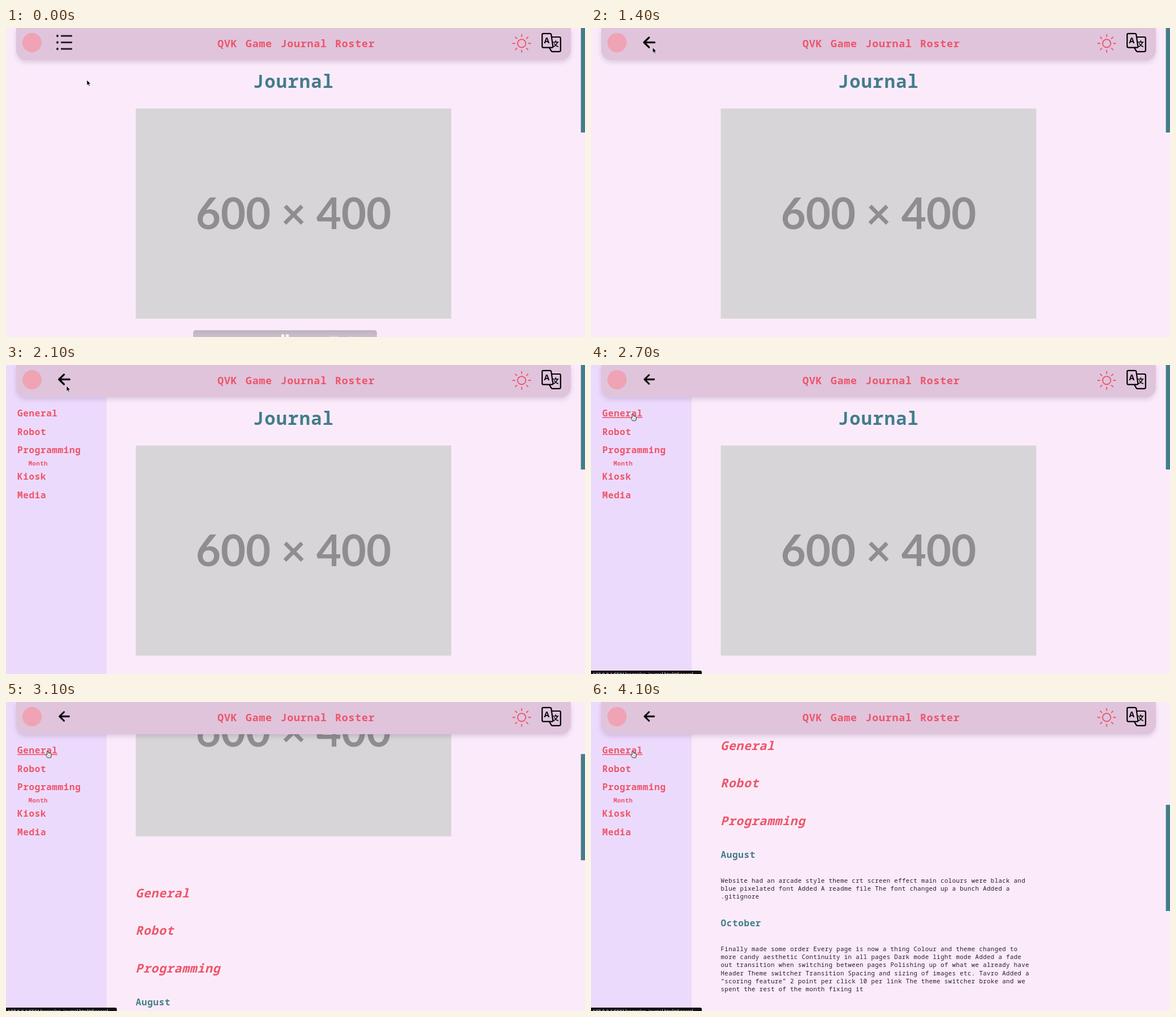
These frames come from a looping animation (1024x547 px, 4.2 s). An HTML page:

```html
<!DOCTYPE html>
<html lang="en">
<head>
<meta charset="utf-8">
<title>Journal</title>
<style>
  :root { --red: #ee5569; --teal: #437d8a; }
  html, body { margin: 0; width: 100%; height: 100%; overflow: hidden; background: #fbebfa; }
  #stage { position: relative; width: 1024px; height: 547px; overflow: hidden; background: #fbebfa; }
  #stage svg { position: absolute; left: 0; top: 0; display: block; }
  text { font-family: "Noto Sans Mono", "DejaVu Sans Mono", monospace; font-size: 10.7px; letter-spacing: .038em; }
  .nav, .title, .side, .small, .head, .month { font-weight: 700; fill: var(--red); }
  .nav { font-size: 18.4px; }
  .title { font-size: 32.1px; fill: var(--teal); text-anchor: middle; }
  .head { font-size: 21.4px; font-style: italic; }
  .side, .month { font-size: 16.05px; }
  .month { fill: var(--teal); }
  .body { fill: #231f25; }
  .size { font: 700 76px Lato, sans-serif; letter-spacing: 0; fill: #8f8d90; text-anchor: middle; }
  .url { font: 8.5px "Liberation Sans", Arial, sans-serif; letter-spacing: 0; fill: #fff; }
  .letter { font: 700 14px "Open Sans", sans-serif; letter-spacing: 0; text-anchor: middle; }
  #side { position: absolute; left: 0; top: 0; width: 0; height: 547px; overflow: hidden; background: #ecdafc; }
  #header { position: absolute; left: 18px; top: 0; width: 981px; height: 57px; background: #e0c4dc;
    border-radius: 0 0 18px 18px; box-shadow: 0 4px 8px rgba(90, 50, 110, .18); }
  .line { fill: none; stroke: #000; stroke-linecap: round; stroke-linejoin: round; }
</style>
</head>
<body>
<div id="stage">
  <svg width="1024" height="547">
    <g id="page">
      <text class="title" x="508.5" y="106">Journal</text>
      <rect x="229.5" y="142.5" width="558" height="372" fill="#d8d5d8"/>
      <text class="size" x="508.5" y="355.5">600 × 400</text>
    </g>
    <rect id="thumb" x="1016.7" width="7.3" height="188" fill="#437d8a"/>
  </svg>

  <div id="side"><svg id="links" width="178" height="547">
    <rect id="underline" x="20" y="92.2" width="71" height="1.6" fill="#ee5569"/>
  </svg></div>

  <div id="header"></div>

  <svg id="top" width="1024" height="547">
    <defs>
      <linearGradient id="shade" x2="0" y2="1">
        <stop stop-color="#bdb1bd"/><stop offset="1" stop-color="#c9bfc9"/>
      </linearGradient>
    </defs>
    <circle cx="46" cy="26" r="17" fill="#efa3b4"/>
    <g transform="translate(103 25.5)"><g id="icon">
      <g id="menu">
        <path class="line" stroke-width="2.4" d="M-5-11.5H13M-5 0H13M-5 11.5H13"/>
        <path class="line" stroke-width="3.8" d="M-12-11.5h.01M-12 0h.01M-12 11.5h.01"/>
      </g>
      <path id="back" class="line" stroke-width="2.9" d="M8.6 0H-8.4M-.4-7.8L-8.4 0-.4 7.8"/>
    </g></g>
    <g id="sun" transform="translate(912 27.3)" fill="none" stroke="#ee5569" stroke-width="1.9" stroke-linecap="round">
      <circle r="7.2"/>
    </g>
    <g class="line" stroke-width="2.2">
      <path d="M950.2 9.8H962q2 0 2.300 2l3 21q.2 1.800-1.600 1.800H950.200q-2 0-2-2V11.800q0-2 2-2z"/>
      <path d="M965.500 16H978.600q2.200 0 2.200 2.200V39.600q0 2.200-2.200 2.200H966.500q-1.600 0-2.300-1.400L961 35"/>
      <path stroke-width="1.6" d="M967.800 25h9M972.300 22.600V25M975.300 25q-1.500 5.500-6.800 8M969.800 27.500q2 4 6.500 5.500"/>
    </g>
    <text class="letter" x="956.3" y="27">A</text>

    <g id="player">
      <path d="M331 547V540q0-5 5-5H651q5 0 5 5V547z" fill="url(#shade)"/>
      <path d="M487 542.500h5V547h-5zM495 542.500h5V547h-5z" fill="#fff"/>
      <path d="M573 547V545.500H586V547M607 547L609.500 545 612 547" fill="none" stroke="#dfd8df"/>
    </g>
    <g id="status">
      <path d="M0 541H193q3 0 3 3V547H0z" fill="#121014"/>
      <text class="url" x="3" y="550.500">127.0.0.1:5501/pages/en_journal.html#General</text>
    </g>
    <g id="cursor">
      <path id="arrow" d="M0 0V9.500L2.200 7.500 3.800 11 5.400 10.300 3.900 6.900H6.900z" stroke="#fff" stroke-width=".7"/>
      <g id="hand" fill="#fff" stroke="#1a1418" stroke-linejoin="round">
        <path d="M-1.200 1Q0-.6 1.200 1V4Q5 4 6 5.500V8Q6 10 5 12H-.5Q-2 9.500-3.600 7.500-3 5.600-1.200 7z"/>
        <path d="M1.200 7.500v2M3.200 7.500v2" stroke-width=".6"/>
      </g>
    </g>
  </svg>
</div>
<script>
const LOOP = 4200, STEP = 100, SCROLL = 538;
const $ = id => document.getElementById(id);

function add(parent, tag, attrs, content = '') {
  const el = document.createElementNS('http://www.w3.org/2000/svg', tag);
  for (const name in attrs) el.setAttribute(name, attrs[name]);
  el.textContent = content;
  $(parent).append(el);
}
const write = (parent, cls, x, y, str) => add(parent, 'text', { class: cls, x, y }, str);
const lines = (y, list) => list.forEach((str, i) => write('page', 'body', 229.5, y + i * 14.2, str));

[['QVK', 374], ['Game', 423.7], ['Journal', 485.5], ['Roster', 582]]
  .forEach(([str, x]) => write('top', 'nav', x, 34, str));
[['General', 91], ['Robot', 123.5], ['Programming', 156], ['Kiosk', 203], ['Media', 235.5]]
  .forEach(([str, y]) => write('links', 'side', 20, y, str));
write('links', 'small', 39.7, 177.5, 'Month');

[['General', 623], ['Robot', 689], ['Programming', 755.5]]
  .forEach(([str, y]) => write('page', 'head', 229, y, str));
write('page', 'month', 229.5, 814, 'August');
lines(858, [
  'Website had an arcade style theme crt screen effect main colours were black and',
  'blue pixelated font Added A readme file The font changed up a bunch Added a',
  '.gitignore'
]);
write('page', 'month', 229.5, 935, 'October');
lines(979, [
  'Finally made some order Every page is now a thing Colour and theme changed to',
  'more candy aesthetic Continuity in all pages Dark mode light mode Added a fade',
  'out transition when switching between pages Polishing up of what we already have',
  'Header Theme switcher Transition Spacing and sizing of images etc. Tavro Added a',
  '“scoring feature” 2 point per click 10 per link The theme switcher broke and we',
  'spent the rest of the month fixing it'
]);
for (let a = 0; a < 360; a += 45)
  add('sun', 'path', { d: 'M0-12.2V-15.6', transform: `rotate(${a})` });

// Each step: [time, value, easing towards the next step].
const tracks = [];
function track(id, prop, steps) {
  const all = [[0, steps[0][1]], ...steps, [LOOP, steps.at(-1)[1]]];
  const frames = all.map(([t, value, easing = 'linear']) => ({ offset: t / LOOP, [prop]: value, easing }));
  const anim = $(id).animate(frames, { duration: LOOP, fill: 'both' });
  anim.pause();
  tracks.push(anim);
}
const show = (id, from, to = LOOP) => track(id, 'opacity',
  [[0, from ? 0 : 1, 'steps(1)'], [from, 1, 'steps(1)'], [to, to < LOOP ? 0 : 1]]);
const move = (x, y) => `translate(${x}px, ${y}px)`;
const glide = (id, from, to) => track(id, 'transform',
  [[2764, move(0, from), 'cubic-bezier(.42, 0, .58, 1)'], [3425, move(0, to)]]);

glide('page', 0, -SCROLL);
glide('thumb', -3, 182);
track('side', 'width', [[1430, '0px', 'ease'], [1930, '178px']]);
track('icon', 'transform', [[600, 'scale(1)'], [800, 'scale(1.1)'], [2200, 'scale(1.1)'], [2400, 'scale(1)']]);
track('player', 'opacity', [[100, 1], [600, 0]]);
track('cursor', 'transform', [
  [100, move(143, 92), 'ease-in-out'], [600, move(117, 38)], [800, move(117, 37)],
  [1200, move(110, 35)], [1600, move(108, 34)], [2100, move(107, 37), 'ease-in-out'],
  [2500, move(74, 86.5)]
]);
show('menu', 0, 1400);
show('back', 1400);
show('arrow', 0, 2400);
show('hand', 2400);
show('underline', 2400);
show('status', 2500);

const start = performance.now();
function draw() {
  const t = Math.floor((performance.now() - start) % LOOP / STEP) * STEP;
  for (const anim of tracks) anim.currentTime = t;
  requestAnimationFrame(draw);
}
draw();
</script>
</body>
</html>
```
